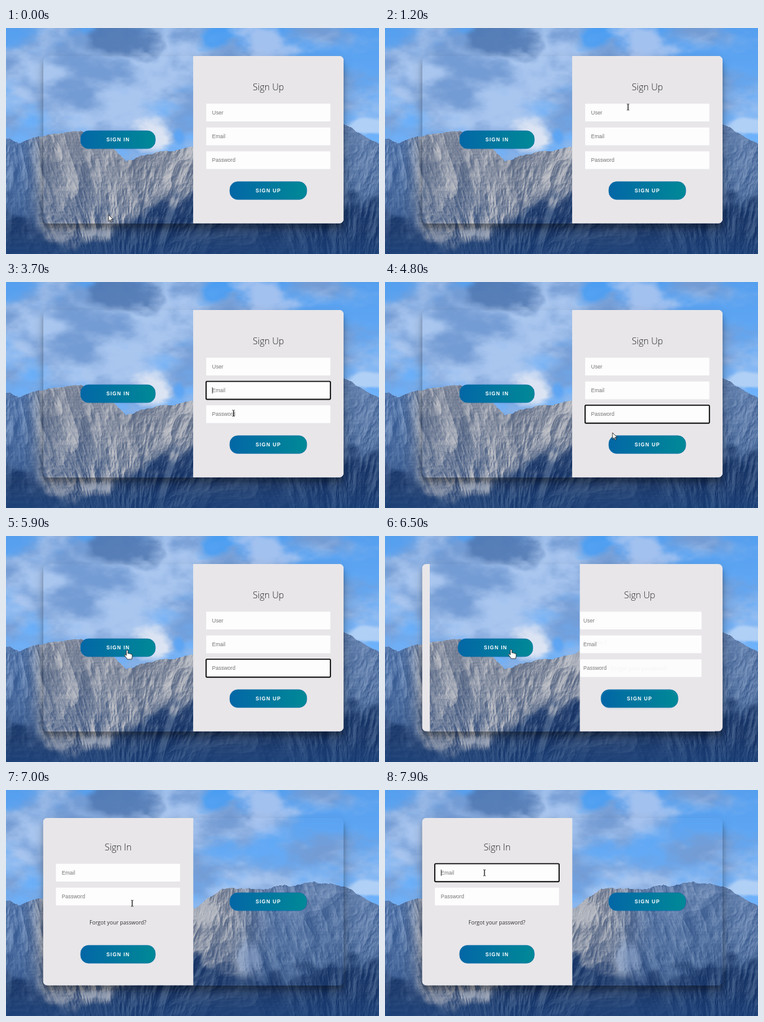
An HTML page with a canvas that plays this animation: 600x363 px, repeating every 8000 ms.

```html
<!DOCTYPE html>
<html lang="en">
<head>
<meta charset="utf-8">
<title>Sign in and sign up</title>
<style>
html, body { margin: 0; width: 100%; height: 100%; overflow: hidden; background: #5b9fe9; }
canvas, svg { position: absolute; left: 0; top: 0; width: 600px; height: 363px; }
#shadow {
  position: absolute; left: 59.5px; top: 45px; width: 483.5px; height: 268.8px; border-radius: 7px;
  box-shadow: 0 9.2px 17.4px rgba(0,0,0,.25), 0 7.1px 7.1px rgba(0,0,0,.22);
}
text { font-family: "Liberation Sans", Arial, sans-serif; }
.title { font: 300 14.5px "Open Sans", sans-serif; fill: #222; text-anchor: middle; }
.link { font: 8.65px "Open Sans", sans-serif; fill: #333; text-anchor: middle; }
.hint { font-size: 8.5px; fill: #757575; }
.btn { font-size: 8.2px; font-weight: bold; letter-spacing: 1.02px; fill: #fff; }
.ring { fill: none; stroke: #101010; stroke-width: 1.9; }
#cursor { pointer-events: none; stroke: #1a1a1a; stroke-width: .85; fill: #fff; }
</style>
</head>
<body>
<canvas id="scene" width="600" height="363"></canvas>
<div id="shadow"></div>
<svg id="stage" viewBox="0 0 600 363"></svg>
<script>
const $ = id => document.getElementById(id);
const mix = (a, b, k) => a + (b - a) * k;
const blend = (a, b, k) => a.map((v, i) => mix(v, b[i], k));
const ease = k => k * k * (3 - 2 * k);
const smooth = (a, b, v) => ease(Math.min(1, Math.max(0, (v - a) / (b - a))));
const rgb = hex => [1, 3, 5].map(i => parseInt(hex.slice(i, i + 2), 16));

// ---------- scenery ----------
function hash(x, y) {
  let h = Math.imul(x, 374761393) + Math.imul(y, 668265263);
  h = Math.imul(h ^ (h >>> 13), 1274126177);
  return ((h ^ (h >>> 16)) >>> 0) / 4294967296;
}

function noise(x, y) {
  const i = Math.floor(x), j = Math.floor(y), u = ease(x - i), v = ease(y - j);
  return mix(mix(hash(i, j), hash(i + 1, j), u), mix(hash(i, j + 1), hash(i + 1, j + 1), u), v);
}

// Layered noise; "shape" bends each layer.
function layers(x, y, shape = n => n) {
  let sum = 0, total = 0;
  for (let i = 0, amp = 1; i < 5; i++, amp *= .5) {
    sum += amp * shape(noise(x * 2 ** i + i * 17, y * 2 ** i + i * 31));
    total += amp;
  }
  return sum / total;
}

function along(points, x) {
  const i = Math.max(1, points.findIndex(p => p[0] >= x));
  const [ax, ay] = points[i - 1], [bx, by] = points[i];
  return mix(ay, by, (x - ax) / (bx - ax));
}

const RIDGE = [[0, 176], [20, 184], [60, 172], [100, 166], [152, 168], [192, 213], [240, 200],
  [303, 190], [346, 157], [420, 158], [495, 147], [545, 155], [600, 187]];
const SHADE = [[0, 290], [70, 338], [155, 335], [240, 284], [300, 268], [400, 300], [600, 262]];

const spot = (x, y, rx, ry, color) => ({ x, y, rx, ry, color: rgb(color) });
const CLOUDS = [
  spot(168, 14, 78, 36, '#5078b2'), spot(340, 14, 38, 30, '#4a9df2'), spot(412, 30, 56, 38, '#a9c4ef'),
  spot(236, 178, 44, 32, '#e4e9f4'), spot(278, 172, 14, 20, '#5aa4f4'), spot(582, 157, 50, 13, '#b4d2f6')
];
const SNOW = [spot(392, 268, 30, 34, '#8ea6cc'), spot(315, 196, 50, 34, '#c6c8cd'), spot(150, 328, 44, 10, '#a9b4c8')];

function paintSpots(color, spots, x, y, wobble, strength) {
  return spots.reduce((c, s) => {
    const d = Math.hypot((x - s.x) / s.rx, (y - s.y) / s.ry);
    return blend(c, s.color, strength * smooth(0, .6, 1 - d + wobble));
  }, color);
}

function sky(x, y) {
  const n = layers(x / 85, y / 50), m = layers(x / 60 + 9, y / 36 + 4);
  const blue = blend(rgb('#559fef'), rgb('#6fb3fc'), y / 190);
  const cloud = blend(rgb('#749cd4'), rgb('#a9c6ef'), smooth(.25, .75, m));
  const cover = smooth(.3, .7, n + .3 * Math.exp(-(((x - 245) / 190) ** 2)) - .06);
  return paintSpots(blend(blue, cloud, cover), CLOUDS, x, y, (m - .5) * 1.5, .9);
}

// Crests lean with the slopes and stretch downhill.
function rock(x, y) {
  const lean = -.35 * Math.cos((x - 100) / 57);
  return layers((x + lean * (y - 240)) / 46, y / 78, n => 1 - Math.abs(2 * n - 1));
}

function mountain(x, y, top) {
  const light = smooth(-.055, .065, rock(x + 1, y + .6) - rock(x, y));
  const sun = smooth(20, 70, x) * (1 - .85 * smooth(350, 440, x));
  const low = smooth(-14, 18, y - along(SHADE, x) + 34 * (noise(x / 18, y / 14) - .5));
  const depth = smooth(0, 170, y - top);
  const lit = blend(blend(rgb('#7f9cc8'), rgb('#c3c4c9'), sun), rgb('#53749f'), depth * (1 - sun) * .7);
  const dim = blend(blend(rgb('#3b5f96'), rgb('#5c6a85'), sun), rgb('#24457c'), depth * .6);
  const snowy = paintSpots(blend(dim, lit, light), SNOW, x, y, (light - .5) * .5, .6);
  const night = blend(rgb('#122f62'), rgb('#496690'), light * .8);
  return blend(snowy, blend(night, rgb('#16407c'), smooth(320, 363, y) * .5), low * .92);
}

function paintScene() {
  const ctx = $('scene').getContext('2d');
  const image = ctx.createImageData(600, 363);
  for (let x = 0; x < 600; x++) {
    const top = along(RIDGE, x) + 7 * (layers(x / 12, 3) - .5);
    for (let y = 0; y < 363; y++) {
      const color = y < top ? sky(x, y) : mountain(x, y, top);
      image.data.set([...color, 255], (y * 600 + x) * 4);
    }
  }
  ctx.putImageData(image, 0, 0);
}

// ---------- card ----------
const CARD = { x: 59.5, y: 45, w: 483.5, h: 268.8 };
const HALF = CARD.w / 2;
const ROW = 38.25;

const rect = (x, y, w, h, more = '') => `<rect x="${x}" y="${y}" width="${w}" height="${h}" ${more}/>`;
const text = (cls, x, y, s) => `<text class="${cls}" x="${x}" y="${y}">${s}</text>`;
const sheet = x => rect(x, CARD.y, HALF, CARD.h, 'fill="#e8e6e9"');

const field = (id, x, y, label) => `<g data-cursor="beam">
  ${rect(x, y, 199.6, 28.4, 'fill="#fefdfe"')}${text('hint', x + 9.5, y + 17.2, label)}
  <g id="${id}${label}" visibility="hidden">
    ${rect(x - .2, y - .2, 200, 28.8, 'rx="1.6" class="ring"')}
    ${rect(x + 9.6, y + 9.2, .8, 10.2, 'class="caret" fill="#111"')}
  </g></g>`;

const button = (x, y, w, label) => `<g data-cursor="hand">
  ${rect(x, y, w, 28.8, 'rx="12.8" fill="url(#teal)" stroke="#0367a6" stroke-width=".6"')}
  ${text('btn', x + 41.6, y + 17.2, label)}</g>`;

const signInBtn = y => button(120, y, 120.2, 'SIGN IN');
const signUpBtn = y => button(360, y, 123.8, 'SIGN UP');

const form = (id, x, top, title, labels, rest) => `<g id="${id}">
  ${sheet(x)}
  ${text('title', x + HALF / 2, top - 21.5, title)}
  ${labels.map((label, i) => field(id, x + 20.8, top + i * ROW, label)).join('')}
  ${rest}</g>`;

$('stage').innerHTML = `
<defs>
  <linearGradient id="teal"><stop stop-color="#0367a6"/><stop offset="1" stop-color="#008997"/></linearGradient>
  <clipPath id="round">${rect(CARD.x, CARD.y, CARD.w, CARD.h, 'rx="7"')}</clipPath>
  <clipPath id="sides"><path id="sidesPath"/></clipPath>
  <clipPath id="pane"><path id="panePath"/></clipPath>
</defs>
<g clip-path="url(#round)">
  <g clip-path="url(#sides)">
    ${sheet(CARD.x)}${sheet(CARD.x + HALF)}
    ${form('signIn', CARD.x, 118.6, 'Sign In', ['Email', 'Password'],
      text('link', 180, 216, 'Forgot your password?') + signInBtn(249.4))}
    ${form('signUp', CARD.x + HALF, 121.6, 'Sign Up', ['User', 'Email', 'Password'], signUpBtn(246.8))}
  </g>
  <g clip-path="url(#pane)">
    <g id="leftBtn">${signInBtn(165)}</g>
    <g id="rightBtn">${signUpBtn(165)}</g>
  </g>
</g>
<g id="cursor">
  <path id="arrow" d="M0 0V10.5L2.5 8.2 4.2 12 5.8 11.3 4.1 7.6H7.4Z"/>
  <path id="beam" d="M-2-5Q0-5 0-4V4Q0 5-2 5M2-5Q0-5 0-4V4Q0 5 2 5" fill="none"/>
  <path id="hand" d="M-1.4 1.2Q0-1.2 1.2 1.2V6Q2.6 4.6 3.6 6.3 5 5.2 5.9 6.9 8 6.2 8 8V11.5L7 15H.2L-4.6 8.4Q-3.4 6.6-1.4 8.8Z"/>
</g>`;

// ---------- timing ----------
const LOOP = 8000;
const SLIDE = { start: 6405, length: 600 };
const BLINK = 500;

// Cursor rests: [arrive, leave, x, y]
const RESTS = [[0, 200, 165, 300], [1200, 1200, 391, 127], [2400, 2900, 365, 174], [3800, 4500, 366, 212],
  [4800, 5000, 366, 242], [5850, 6100, 195, 183], [6400, 7100, 203, 182], [7600, LOOP, 160, 133]];

// [from, to, field]
const FOCUS = [[2300, 3905, 'signUpEmail'], [3905, 6300, 'signUpPassword'], [7600, LOOP, 'signInEmail']];

// cubic-bezier(.42, 0, .58, 1)
function easeInOut(x) {
  if (x <= 0 || x >= 1) return x <= 0 ? 0 : 1;
  let lo = 0, hi = 1, u;
  for (let i = 0; i < 24; i++) {
    u = (lo + hi) / 2;
    if (3 * u * (1 - u) * (.42 + .16 * u) + u ** 3 < x) lo = u; else hi = u;
  }
  return ease(u);
}

function cursorAt(t) {
  const i = RESTS.findIndex(([, leave]) => t <= leave);
  const [arrive, , x, y] = RESTS[i];
  if (t >= arrive) return [x, y];
  const [, leave, fromX, fromY] = RESTS[i - 1];
  const k = ease((t - leave) / (arrive - leave));
  return [mix(fromX, x, k), mix(fromY, y, k)];
}

function cursorKind(x, y) {
  const hit = document.elementFromPoint(x, y)?.closest('[data-cursor]');
  return hit ? hit.dataset.cursor : 'arrow';
}

const show = (el, on) => { el.style.display = on ? '' : 'none'; };
const shift = (id, x, y = 0) => $(id).setAttribute('transform', `translate(${x} ${y})`);
const strip = (a, b) => `M${a} ${CARD.y}H${b}V${CARD.y + CARD.h}H${a}Z`;

function render(t) {
  const p = easeInOut((t - SLIDE.start) / SLIDE.length);
  const left = CARD.x + HALF * p, right = left + HALF;
  $('sidesPath').setAttribute('d', strip(CARD.x, left) + strip(right, CARD.x + CARD.w));
  $('panePath').setAttribute('d', strip(left, right));
  shift('signIn', HALF * (1 - p));
  shift('signUp', -HALF * p);
  shift('leftBtn', -.2 * HALF * p);
  shift('rightBtn', .2 * HALF * (1 - p));
  $('signUp').setAttribute('opacity', 1 - p);
  show($('signUp'), p < .625);

  FOCUS.forEach(([from, to, id]) => {
    const on = t >= from && t < to;
    $(id).setAttribute('visibility', on ? 'visible' : 'hidden');
    show($(id).querySelector('.caret'), Math.floor((t - from) / BLINK) % 2 === 0);
  });

  const [x, y] = cursorAt(t), kind = cursorKind(x, y);
  shift('cursor', x, y);
  ['arrow', 'beam', 'hand'].forEach(id => show($(id), id === kind));
}

paintScene();
const begin = performance.now();
function tick() {
  render((performance.now() - begin) % LOOP);
  requestAnimationFrame(tick);
}
tick();
</script>
</body>
</html>
```
